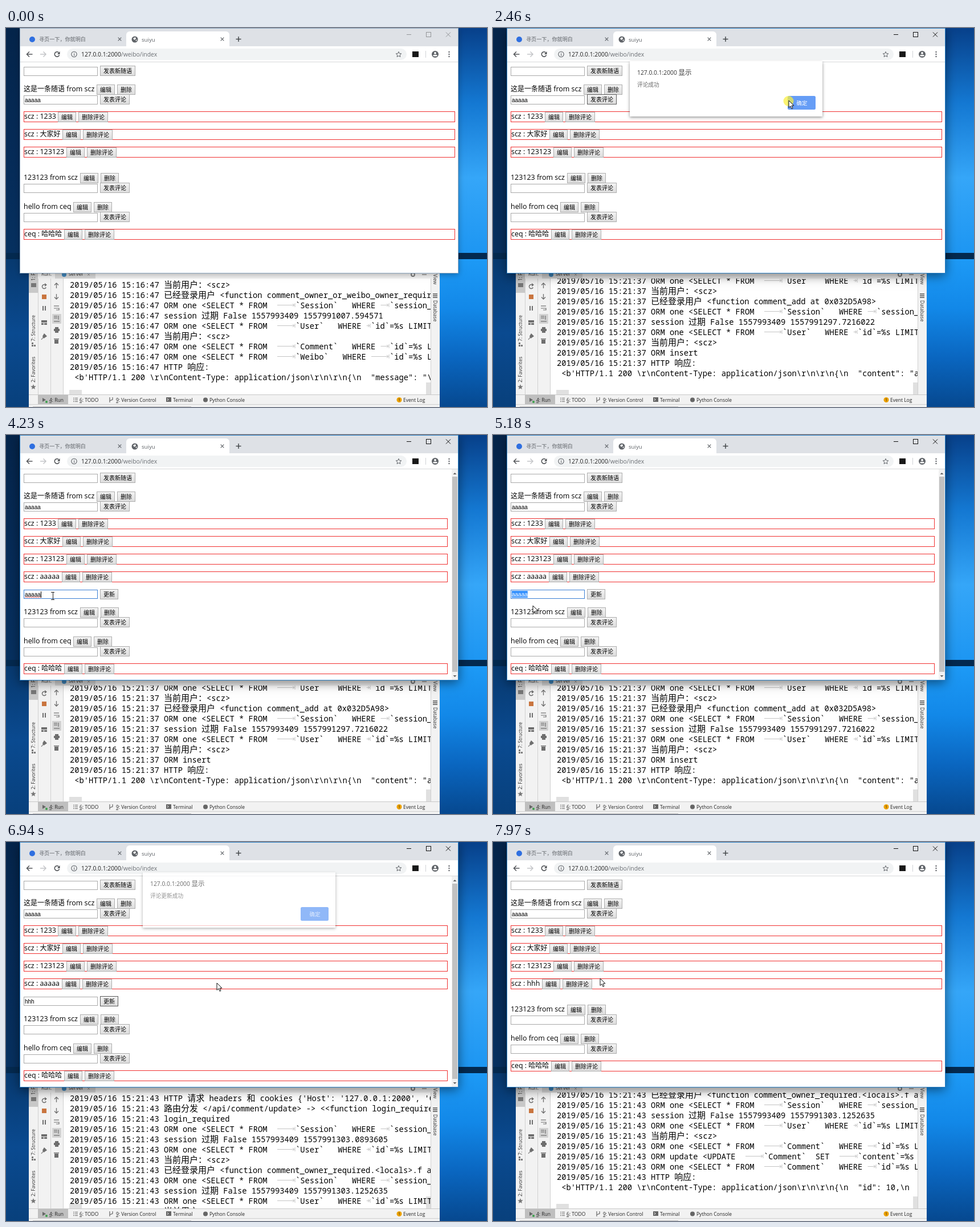
These frames come from a looping animation (844x664 px, 8 s). An HTML page with a canvas:

```html
<!DOCTYPE html>
<html lang="zh">
<head>
<meta charset="utf-8">
<title>suiyu</title>
<style>
html, body { margin: 0; width: 100%; height: 100%; overflow: hidden; background: #04264f; }
canvas { display: block; width: 844px; height: 664px; }
</style>
</head>
<body>
<canvas id="stage" width="844" height="664"></canvas>
<script>
const ctx = document.getElementById('stage').getContext('2d');
const LOOP = 8000, TICK = LOOP / 104;
const CJK = '"Noto Sans CJK SC", "Noto Sans CJK", sans-serif';
const UI = '"Open Sans", "Noto Sans", sans-serif';
const MONO = '"Noto Sans Mono", "DejaVu Sans Mono", monospace';
const ARIAL = '"Liberation Sans", Arial, sans-serif';
const ME = 'scz', OTHER = 'ceq';

// When things happen, in ms
const T = {
  pointer: 70, active: 905, alert1: 1500, log1: 1600, close1: 2600, posted: 2640,
  form: 3600, focus: 3770, drag: 4240, dragged: 4480,
  keys: 5325, keyGap: 155, commit: 6250, update: 6420,
  alert2: 6840, log2: 6900, close2: 7640, saved: 7645
};

// Pointer moves; the time each takes follows from its length
const HOME = [638, 503];
const MOVES = [
  { at: 250, to: [75, 77], press: true },
  { at: 900, to: [199, 125], press: true },
  { at: 1900, to: [519, 127], press: true },
  { at: 2950, to: [108, 247], press: true },
  { at: 3800, to: [82, 282], press: true },
  { at: T.drag, to: [12, 281] },
  { at: 4600, to: [70, 299] },
  { at: 5700, to: [131, 299] },
  { at: 6200, to: [180, 277], press: true },
  { at: 6640, to: [370, 247] },
  { at: 7100, to: [522, 128], press: true },
  { at: 7580, to: [188, 239] }
];

const within = (t, a, b) => t >= a && t < b;
const clamp = k => Math.max(0, Math.min(1, k));
const smooth = k => k * k * (3 - 2 * k);

function pointer(t) {
  let [x, y] = HOME, pressed = false;
  for (const { at, to, press } of MOVES) {
    if (t < at) break;
    const dx = to[0] - x, dy = to[1] - y;
    const span = 200 + 0.4 * Math.hypot(dx, dy);
    const k = smooth(clamp((t - at) / span));
    x += dx * k;
    y += dy * k;
    pressed = press && within(t - at - span, 0, 200);
  }
  return { x, y, pressed };
}

// ---- drawing helpers ----
function rect(x, y, w, h, fill) {
  ctx.fillStyle = fill;
  ctx.fillRect(x, y, w, h);
}

function box(x, y, w, h, color) {
  ctx.strokeStyle = color;
  ctx.lineWidth = 1;
  ctx.strokeRect(x + 0.5, y + 0.5, w - 1, h - 1);
}

function pill(x, y, w, h, r, fill) {
  ctx.beginPath();
  ctx.roundRect(x, y, w, h, r);
  ctx.fillStyle = fill;
  ctx.fill();
}

function disc(x, y, r, fill) {
  ctx.beginPath();
  ctx.arc(x, y, r, 0, 7);
  ctx.fillStyle = fill;
  ctx.fill();
}

function ring(x, y, r, color, w = 1, from = 0, to = 2 * Math.PI) {
  ctx.beginPath();
  ctx.arc(x, y, r, from, to);
  ctx.strokeStyle = color;
  ctx.lineWidth = w;
  ctx.stroke();
}

function trace(pts) {
  ctx.beginPath();
  for (let i = 0; i < pts.length; i += 2) ctx.lineTo(pts[i], pts[i + 1]);
}

function line(color, w, ...pts) {
  trace(pts);
  ctx.strokeStyle = color;
  ctx.lineWidth = w;
  ctx.stroke();
}

function poly(fill, ...pts) {
  trace(pts);
  ctx.closePath();
  ctx.fillStyle = fill;
  ctx.fill();
}

function cross(x, y, r, color, w = 1) {
  line(color, w, x - r, y - r, x + r, y + r);
  line(color, w, x + r, y - r, x - r, y + r);
}

function star(x, y, r, inner) {
  const pts = [];
  for (let i = 0; i <= 10; i++) {
    const d = i % 2 ? inner : r, a = i * Math.PI / 5;
    pts.push(x + d * Math.sin(a), y - d * Math.cos(a));
  }
  return pts;
}

function fade(y0, y1, ...colors) {
  const g = ctx.createLinearGradient(0, y0, 0, y1);
  colors.forEach((c, i) => g.addColorStop(i / (colors.length - 1), c));
  return g;
}

// Latin and CJK runs keep their own sizes; y is the middle of the line
function put(s, x, y, size, color = '#000', wide = size, face = UI, weight = '') {
  ctx.fillStyle = color;
  for (const run of s.match(/[ -~]+|[^ -~]+/g) || []) {
    const latin = run < '\x7f';
    ctx.font = `${weight} ${latin ? size : wide}px ${latin ? face : CJK}`;
    ctx.fillText(run, x, y + wide * 0.37);
    x += latin ? ctx.measureText(run).width : wide * run.length;
  }
  return x;
}

function turned(s, x, y, angle) {
  ctx.save();
  ctx.translate(x, y);
  ctx.rotate(angle);
  put(s, 0, 0, 8.5, '#333');
  ctx.restore();
}

// ---- desktop ----
function desktop() {
  rect(0, 0, 844, 394, fade(0, 394, '#04244a', '#052a56', '#06305f'));
  rect(0, 405, 844, 259, fade(405, 664, '#07396f', '#0a4a90', '#08407c'));
  rect(761, 0, 83, 394, fade(0, 394, '#07408a', '#1478d2', '#35a6f8', '#1d96f2'));
  rect(761, 405, 83, 259, fade(405, 664, '#1d9af6', '#1288e8', '#0a66c0', '#06488f'));
  rect(0, 394, 844, 11, '#03294f');
}

// ---- IDE window ----
const select = (table, column) => `ORM one <SELECT * FROM  \t\`${table}\`   WHERE \t\`${column}\`=%s LIMIT 1`;
const auth = time => [select('Session', 'session_id'), `session 过期 False 1557993409 ${time}`,
  select('User', 'id'), `当前用户：<${ME}>`];

const request = (path, handler, t0, t1, work, reply) => [
  "HTTP 请求 headers 和 cookies {'Host': '127.0.0.1:2000', 'Connection'",
  `路由分发 </api/comment/${path}> -> <<function login_required.<locals>`,
  'login_required', ...auth(t0),
  `已经登录用户 <function ${handler}`, ...auth(t1), ...work, 'HTTP 响应:',
  ` <b'HTTP/1.1 200 \\r\\nContent-Type: application/json\\r\\n\\r\\n{\\n  ${reply}`
];

const LOGS = {
  '15:16:47': request('delete', 'comment_owner_or_weibo_owner_required.<locals>', '1557991007.551571',
    '1557991007.594571', [select('Comment', 'id'), select('Weibo', 'id')], '"message": "\\\\u'),
  '15:21:37': request('add', 'comment_add at 0x032D5A98>', '1557991297.6856984',
    '1557991297.7216022', ['ORM insert'], '"content": "aaaaa'),
  '15:21:43': request('update', 'comment_owner_required.<locals>.f at 0x', '1557991303.0893605',
    '1557991303.1252635', [select('Comment', 'id'),
      'ORM update <UPDATE  \t`Comment`  SET  \t`content`=%s', select('Comment', 'id')], '"id": 10,\\n  "user')
};

function logLine(s, y) {
  const left = 112, tab = 33;
  let x = left;
  s.split('\t').forEach((part, i) => {
    if (i) {
      const stop = left + (Math.floor((x - left + 0.5) / tab) + 1) * tab;
      line('#c4c4c4', 1, x + 1, y + 0.5, stop - 2, y + 0.5);
      line('#c4c4c4', 1, stop - 5, y - 2, stop - 2, y + 0.5, stop - 5, y + 3);
      line('#c4c4c4', 1, stop - 1, y - 3, stop - 1, y + 4);
      x = stop;
    }
    x = put(part, x, y, 13.75, '#000', 15, MONO);
  });
}

function consoleText(t) {
  const stamp = t < T.log1 ? '15:16:47' : t < T.log2 ? '15:21:37' : '15:21:43';
  const rows = LOGS[stamp];
  const justIn = [T.log1, T.log2].some(at => within(t - at, 0, 90));
  const last = t < T.log1 ? 611 : 604;
  const first = justIn ? 448 : last - 18 * (rows.length - 1);
  ctx.save();
  ctx.beginPath();
  ctx.rect(101, 439, 644, 204);
  ctx.clip();
  rows.forEach((row, i) => {
    const y = first + 18 * i;
    if (y > 425 && y < 655) logLine(row[0] === ' ' ? row : `2019/05/16 ${stamp} ${row}`, y);
  });
  ctx.restore();
}

function toolIcons() {
  const c = '#6e6e6e';
  ring(67, 453, 3.5, c, 1.5, 0.4, 5);
  poly(c, 68, 447, 72, 450, 68, 453);
  rect(63, 467, 8, 8, '#c9753f');
  rect(64, 487, 2, 8, c);
  rect(68, 487, 2, 8, c);
  rect(62, 512, 10, 4, c);
  rect(62, 517, 4, 3, c);
  rect(67, 517, 5, 3, c);
  poly(c, 67, 535, 72, 540, 66, 544, 64, 540);
  line(c, 1.2, 66, 541, 62, 546);
  for (const [tail, tip, d] of [[456, 447, 1], [466, 475, -1]]) {
    line(c, 1.3, 88.5, tail, 88.5, tip);
    line(c, 1.3, 85, tip + 3.5 * d, 88.5, tip, 92, tip + 3.5 * d);
  }
  line(c, 1.2, 84, 487, 93, 487);
  line(c, 1.2, 84, 491, 93, 491, 93, 494, 88, 494);
  rect(81, 501, 16, 17, '#d2d2d2');
  for (const y of [505, 508]) line(c, 1.2, 84, y, 90, y);
  line(c, 1.2, 84, 514, 94, 514);
  line(c, 1.2, 92, 504, 92, 511);
  rect(84, 527, 10, 4, c);
  rect(86, 524, 6, 10, c);
  rect(85, 546, 7, 7, c);
  rect(84, 544, 9, 1.4, c);
}

function ide(t) {
  rect(40, 420, 721, 244, '#f2f2f2');
  rect(40, 420, 16, 44, '#c9c9c9');
  rect(86, 420, 71, 19, '#d8d8d8');
  put('Run:', 62, 431, 8.5, '#333');
  disc(102, 432, 4, '#3f84b8');
  put('server', 110, 431, 9, '#333');
  cross(145, 432, 2, '#999');
  ring(714, 432, 3, '#777', 1.8);
  line('#777', 1.2, 730, 432, 738, 432);
  rect(101, 439, 644, 204, '#fff');
  for (const x of [56, 78, 100, 745]) rect(x, 439, 1, 204, '#d0d0d0');
  toolIcons();
  turned('1: P', 48, 443, -Math.PI / 2);
  rect(44, 447, 9, 7, '#777');
  turned('7: Structure', 48, 549, -Math.PI / 2);
  for (const [x, y] of [[45, 555], [49, 555], [45, 551]]) rect(x, y, 3, 3, '#777');
  turned('2: Favorites', 48, 621, -Math.PI / 2);
  poly('#777', ...star(48, 629, 5, 2.2));
  turned('View', 753, 431, Math.PI / 2);
  for (const y of [465, 468, 471]) rect(749, y, 8, 2, '#777');
  turned('Database', 753, 477, Math.PI / 2);
  rect(111, 634, 22, 8, '#e0e0e0');
  rect(737, 621, 8, 21, '#e0e0e0');
  consoleText(t);

  rect(40, 642, 721, 1, '#c8c8c8');
  rect(56, 643, 53, 16, '#bfbfbf');
  poly('#666', 64, 648, 70, 651.5, 64, 655);
  disc(71, 655, 2, '#3aa04a');
  for (const y of [648, 651, 654]) {
    rect(118, y, 2, 1, '#666');
    rect(121, y, 5, 1, '#666');
  }
  line('#666', 1.2, 182, 647, 182, 656);
  line('#666', 1.2, 182, 653, 187, 651, 187, 647);
  rect(281, 647, 9, 8, '#666');
  line('#fff', 1, 283, 649, 285, 651, 283, 653);
  disc(350, 651.5, 4, '#666');
  disc(690, 651.5, 4.5, '#eda200');
  put('1', 688, 651.5, 7, '#222');
  const tabs = { '4: Run': 76, '6: TODO': 129, '9: Version Control': 193, 'Terminal': 293,
    'Python Console': 357, 'Event Log': 697 };
  for (const [label, x] of Object.entries(tabs)) {
    put(label, x, 651.5, 8.5, '#222');
    if (label[1] === ':') rect(x, 656, 4, 1, '#444');
  }
  rect(40, 659, 721, 1, '#cfcfcf');
  rect(47, 663, 278, 1, '#bbb');
}

// ---- browser ----
function chrome(t) {
  const active = t >= T.active;
  ctx.save();
  ctx.shadowColor = active ? 'rgba(0,0,0,.5)' : 'rgba(0,0,0,.3)';
  ctx.shadowBlur = active ? 18 : 10;
  ctx.shadowOffsetY = active ? 4 : 2;
  rect(25, 0, 769, 430, '#fff');
  ctx.restore();
  rect(25, 0, 769, 32, '#dee1e6');
  pill(211, 6, 181, 32, 6, '#fff');
  rect(25, 32, 769, 28, '#fff');
  disc(46, 20, 5, '#2f6fe0');
  put('寻页一下，你就明白', 58, 20, 9, '#5f6368', 9.1);
  disc(226, 20, 5.5, '#5f6368');
  poly('#fff', 223, 18, 227, 16, 228, 19, 225, 21);
  poly('#fff', 227, 22, 230, 20, 229, 23);
  put('suiyu', 238, 20, 9.6, '#5f6368');
  for (const x of [199.5, 379.5]) cross(x, 19.5, 2.8, '#5f6368', 1.2);
  line('#3c4043', 1.4, 403.5, 19.5, 412.5, 19.5);
  line('#3c4043', 1.4, 408, 15, 408, 24);

  const ctl = active ? '#111' : '#949699';
  line(ctl, 1, 703, 11.5, 711, 11.5);
  box(737, 7, 9, 9, ctl);
  cross(776, 11.5, 4, ctl);

  for (const [tip, dir, c] of [[36.5, 1, '#4a4d51'], [70, -1, '#bfc1c4']]) {
    line(c, 1.4, tip, 46, tip + 10 * dir, 46);
    line(c, 1.4, tip + 4.5 * dir, 41.5, tip, 46, tip + 4.5 * dir, 50.5);
  }
  ring(89.5, 46, 4.2, '#4a4d51', 1.5, 0.3, 5.5);
  poly('#4a4d51', 94.5, 41, 94.5, 46, 90, 46);
  pill(107, 36, 596, 20, 10, '#f1f3f4');
  ring(119.5, 46, 4.7, '#5f6368', 1.1);
  rect(119, 45.5, 1.2, 3.2, '#5f6368');
  rect(119, 43.2, 1.2, 1.2, '#5f6368');
  put('/weibo/index', put('127.0.0.1:2000', 132, 46, 10.3, '#222'), 46, 10.4, '#6b6f74');
  line('#5f6368', 1, ...star(689, 46.5, 5, 2.3));
  rect(713, 41, 11, 10, '#181818');
  rect(736, 40, 1, 12, '#d0d3d6');
  disc(753, 46, 6, '#5f6368');
  disc(753, 44, 1.9, '#fff');
  pill(749.5, 47, 7, 2.6, 1.3, '#fff');
  for (const y of [42, 46, 50]) disc(777.5, y, 1.2, '#5f6368');
  rect(25, 59, 769, 1, '#d6d8da');
  box(24, 0, 770, 430, active ? '#2a7fc4' : '#8aa4bd');
}

function button(s, x, y, focused) {
  x = Math.round(x);
  y = Math.floor(y);
  const w = s.length * 10 + 12;
  rect(x, y - 9, w, 18, fade(y - 9, y + 9, '#f4f4f4', '#dcdcdc'));
  box(x, y - 9, w, 18, focused ? '#5c5c5c' : '#adadad');
  put(s, x + 6, y + 0.3, 10);
  return x + w + 3.6;
}

function buttons(x, y, ...labels) {
  labels.reduce((left, s) => button(s, left, y), x + 3.6);
}

function field(s, y, focused) {
  rect(31, y - 8, 130, 16, '#fff');
  box(31, y - 8, 130, 16, focused ? '#3b7fd4' : '#a9a9a9');
  put(s, 33, y, 10, '#000', 10, ARIAL);
}

function post(s, y, draft, focused) {
  buttons(put(s, 31, y, 12.45, '#000', 12), y + 1, '编辑', '删除');
  field(draft, y + 19);
  button('发表评论', 165, y + 18, focused);
}

function comment(name, s, y, right) {
  box(31, y - 9, right - 31, 19, '#f03030');
  buttons(put(`${name} : ${s}`, 32, y, 12.45, '#000', 12), y + 1, '编辑', '删除评论');
}

function editForm(t) {
  const focused = within(t, T.focus, T.update);
  const keys = Math.min(3, Math.floor((t - T.keys) / T.keyGap) + 1);
  const typed = keys > 0 ? 'h'.repeat(keys) : 'aaaaa';
  const end = 33 + typed.length * 5.56;
  field(typed, 279, focused);
  button('更新', 165, 279, t >= T.update);
  const from = t < T.dragged ? Math.max(33, pointer(t).x) : 33;
  if (within(t, T.drag, T.keys) && from < end) {
    rect(from, 273, end - from, 12, '#3390ff');
    if (from === 33) put(typed, 33, 279, 10, '#fff', 10, ARIAL);
  } else if (focused) {
    for (let x = 33; x < end; x += 4) line('#e03030', 0.8, x, 285, x + 2, 283.5, x + 4, 285);
    rect(Math.round(end), 274, 1, 11, '#000');
  }
}

function page(t) {
  const posted = t >= T.posted, saved = t >= T.saved;
  const form = within(t, T.form, T.saved);
  const shift = form ? 48 : posted ? 31 : 0;
  const right = form ? 775 : 788;
  field('', 76);
  button('发表新随语', 165, 75);
  post(`这是一条随语 from ${ME}`, 107, 'aaaaa', within(t, T.active + 300, T.form));
  const list = ['1233', '大家好', '123123'];
  if (posted) list.push(saved ? 'hhh' : 'aaaaa');
  list.forEach((s, i) => comment(ME, s, 155 + 31 * i, right));
  if (form) editForm(t);
  post(`123123 from ${ME}`, 262 + shift, '');
  post(`hello from ${OTHER}`, 313 + shift, '');
  comment(OTHER, '哈哈哈', 361 + shift, right);
  if (form) {
    rect(782, 60, 11, 369, '#f1f1f1');
    rect(783, 73, 9, 342, '#c1c1c1');
    for (const [y, d] of [[69, -3], [421, 3]]) poly('#606060', 784.5, y, 787.5, y + d, 790.5, y);
  }
}

function alertBox(t, open, close, message) {
  if (!within(t, open, close + 200)) return;
  const shown = 1 - (1 - clamp((t - open) / 200)) ** 2;
  const e = t < close ? shown : 1 - (t - close) / 200;
  ctx.save();
  ctx.globalAlpha = 0.2 * clamp(e * 4) + 0.8 * e;
  ctx.translate(0, -14.5 * (1 - e));
  // Keep the shadow from showing through the panel
  ctx.save();
  ctx.beginPath();
  ctx.rect(220, 40, 380, 140);
  ctx.rect(240, 58, 338, 97);
  ctx.clip('evenodd');
  ctx.shadowColor = 'rgba(0,0,0,.45)';
  ctx.shadowBlur = 5;
  ctx.shadowOffsetY = 1.5;
  rect(240, 58, 338, 97, '#fff');
  ctx.restore();
  rect(240, 58, 338, 97, '#fff');
  put('127.0.0.1:2000 显示', 253, 78, 10.3, '#333', 11.5);
  put(message, 253, 99.5, 9.7, '#6a6a6a');
  pill(517, 119, 49, 24, 2.5, '#669df6');
  put('确定', 532.5, 131, 9.5, '#fff');
  ctx.restore();
}

// ---- input method panel ----
const WORDS = [
  ['和', '好', '会', '还', '很'],
  ['哈哈', '呵呵', '好好', '嘿嘿', '后悔'],
  ['哈哈哈', '呵呵呵', '好好好', 'O(∩_∩)O哈哈~', '嘿嘿嘿']
];

function ime(t) {
  if (!within(t, T.keys, T.commit)) return;
  const n = Math.min(2, Math.floor((t - T.keys) / T.keyGap));
  const items = WORDS[n].map((w, i) => `${i + 1}.${w}`);
  const width = s => [...s].reduce((sum, c) => sum + (c < '\x7f' ? 6 : 12), 0);
  const end = items.reduce((x, s) => x + width(s) + 10, 41) - 10;
  const right = end + 56;
  rect(32, 289, right - 32, 42, '#fff');
  box(32, 289, right - 32, 42, '#b4cbe6');
  rect(33, 309, right - 34, 1, '#d5e2f0');
  const caret = put('h' + "'h".repeat(n), 41, 299, 12, '#1667c0', 12, UI, 'bold');
  rect(caret + 0.5, 293, 1, 12, '#222');
  if (n === 2) {
    ring(122, 299, 4.5, '#f9c3a8');
    put('6.更多颜文字', 132, 299, 8.5, '#2277cc', 9.2);
  }
  let x = 41;
  items.forEach((s, i) => {
    put(s, x, 320, 10, i ? '#2787d4' : '#e02a2a', 12, MONO);
    x += width(s) + 10;
  });
  for (const dx of [11, 22, 39]) box(end + dx, 315, 11, 11, '#c3d8ee');
  poly('#b8cfe6', end + 18, 318, end + 15, 320.5, end + 18, 323);
  poly('#1677cc', end + 26, 318, end + 29, 320.5, end + 26, 323);
  poly('#1677cc', end + 42, 319, end + 47, 319, end + 44.5, 322);
  rect(right - 23, 290, 21, 21, '#f2845c');
}

// ---- pointer ----
function ibeam() {
  for (const y of [-6.5, 6.5]) line('#222', 1, -3, y, 3, y);
  line('#222', 1, 0.5, -6.5, 0.5, 6.5);
}

function outlined(...pts) {
  poly('#fff', ...pts);
  ctx.strokeStyle = '#111';
  ctx.lineWidth = 1;
  ctx.stroke();
}

function cursor(t) {
  if (t < T.pointer) return;
  const { x, y, pressed } = pointer(t);
  const fields = t < T.form ? [76, 126] : [76, 126, 279];
  const overText = y > 440 || x < 161 && fields.some(mid => Math.abs(y - mid) < 8);
  if (pressed) disc(x - 0.5, y + 1, 9, 'rgba(250,238,60,.72)');
  ctx.save();
  ctx.translate(Math.round(x), Math.round(y));
  if (overText) ibeam();
  else if (within(t, T.keys, T.commit)) {
    outlined(-1, 1, 1, 0, 2, 1, 2, 6, 8, 8, 9, 10, 8, 14, 7, 17, 0, 17, -4, 11, -4, 9, -1, 10);
  } else outlined(0, 0, 0, 12.5, 3, 9.8, 5, 14.5, 7, 13.6, 5, 9, 9, 9);
  ctx.restore();
}

function draw(now) {
  // The screen refreshes at a steady 13 pictures per second
  const t = Math.floor((now % LOOP) / TICK) * TICK;
  desktop();
  ide(t);
  chrome(t);
  page(t);
  ime(t);
  alertBox(t, T.alert1, T.close1, '评论成功');
  alertBox(t, T.alert2, T.close2, '评论更新成功');
  cursor(t);
}

const start = performance.now();
function tick() {
  draw(performance.now() - start);
  requestAnimationFrame(tick);
}
tick();
</script>
</body>
</html>
```
